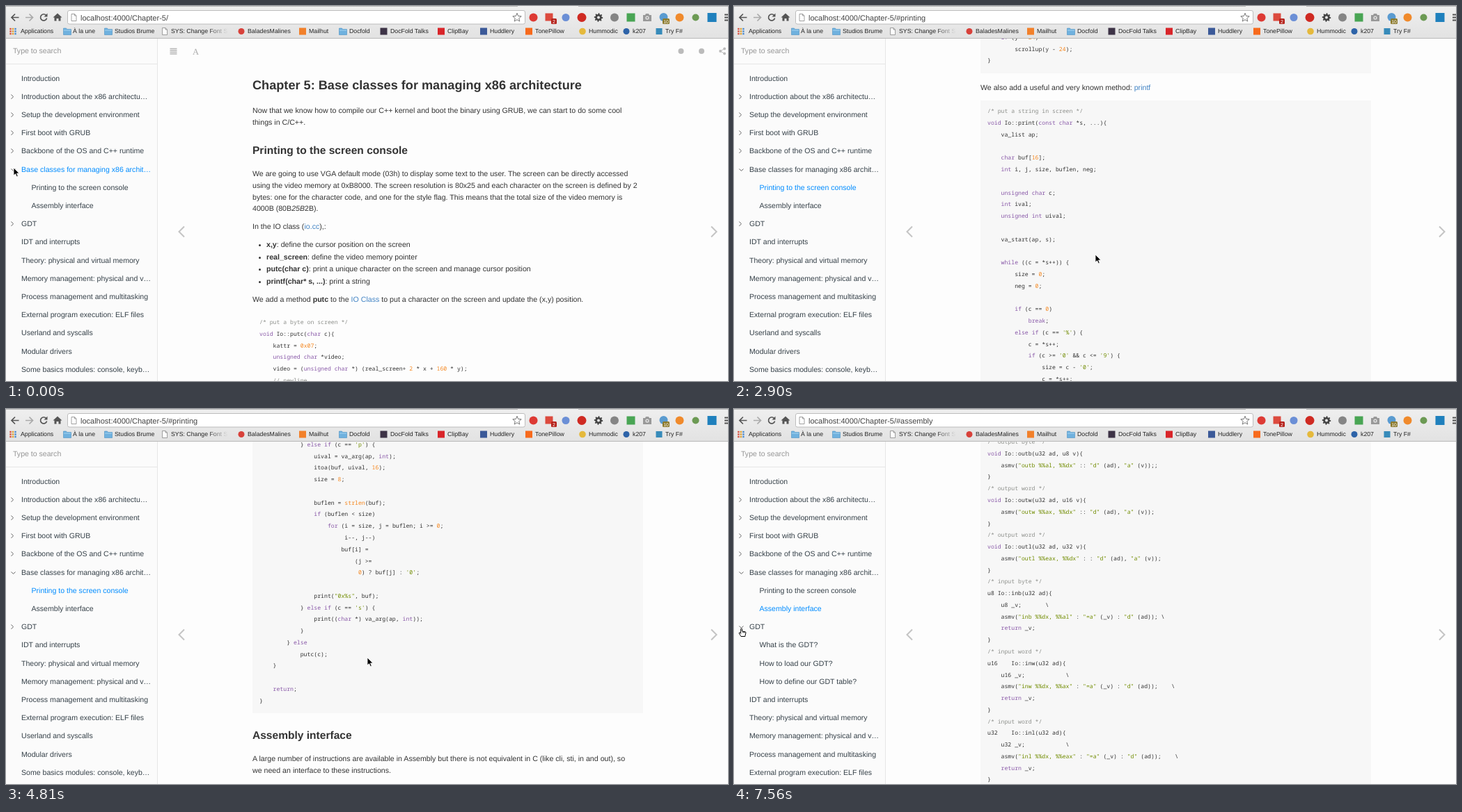
Animation of 1037x540 px, one loop 8000 ms. Source, as an HTML page:

```html
<!DOCTYPE html>
<html lang="en">
<head>
<meta charset="utf-8">
<title>Documentation reader</title>
<style>
  html, body { margin: 0; width: 100%; height: 100%; overflow: hidden; }
  body { background: #fdfdfd; color: #333; font: 10.63px/16.76px "Liberation Sans", Arial, sans-serif; text-rendering: geometricPrecision; }
  #stage { position: relative; width: 1037px; height: 540px; overflow: hidden; }
  #stage svg { position: absolute; left: 0; top: 0; overflow: visible; }
  #page { position: absolute; left: 0; top: 0; width: 1037px; height: 3500px; }
  .line { position: absolute; white-space: pre; height: 20px; line-height: 20px; }
  .line i { font-style: italic; }
  .line u { color: #4183c4; text-decoration: none; }
  .h1 { font-size: 18.15px; font-weight: bold; }
  .h2 { font-size: 15.55px; font-weight: bold; }
  pre { position: absolute; left: 354px; width: 551px; margin: 0; padding: 8.2px 0 9px 10px;
        background: #f7f7f7; font: 8.16px/16.76px "Noto Sans Mono", "DejaVu Sans Mono", monospace; }
  .com { color: #8e908c; }
  .str { color: #718c00; }
  .num { color: #f5871f; }
  .key { color: #8959a8; }
  #side { position: absolute; left: 0; top: 46px; width: 217px; height: 494px; background: #fbfbfb;
          border-right: 1px solid #e6e6e6; overflow: hidden; font-size: 10.57px; }
  #side .search { left: 10px; top: 9px; color: #959595; }
  #side .rule { position: absolute; top: 37px; width: 217px; height: 1px; background: #e6e6e6; }
  .row { color: #364149; left: 0; }
  .row span { position: absolute; left: 22px; }
  .row.sub span { left: 36.5px; }
  .row.on { color: #008cff; }
  .row path { fill: none; stroke: #666; }
</style>
</head>
<body>
<div id="stage">
  <div id="page"></div>
  <div id="side">
    <div class="line search">Type to search</div>
    <div class="rule"></div>
  </div>
  <svg id="chrome" width="1037" height="540" font-family="'Liberation Sans', Arial, sans-serif"></svg>
  <svg id="cursor" width="1" height="1" stroke-linejoin="round">
    <path id="arrow" d="M0 0V11L2.6 8.7 4.4 12.7 6.2 11.9 4.5 8H8Z" fill="#000" stroke="#fff" stroke-width=".8"/>
    <path id="beam" d="M-2.5-6Q0-6 0-4V4Q0 6-2.5 6M2.5-6Q0-6 0-4V4Q0 6 2.5 6M-1.2 2H1.2" fill="none" stroke="#222"/>
    <path id="hand" d="M-1.5 5.5L-3.6 2.2Q-4 .6-2.4 1L-1.3 2.3V-4.4Q-.4-6 .6-4.4V-1L5-.2Q6-.1 6 1.2L5 5.5V6.5H-1Z
      M2-.4V1.4M4-.2V1.5" fill="#fff" stroke="#000"/>
  </svg>
</div>
<script>
const LOOP = 8000;
const $ = id => document.getElementById(id);
const esc = s => s.replace(/&/g, '&amp;').replace(/</g, '&lt;').replace(/>/g, '&gt;');

// ---- article ----
const page = $('page');
const add = html => page.insertAdjacentHTML('beforeend', html);
const line = (y, html, x = 354, cls = '') =>
  add(`<div class="line ${cls}" style="left:${x}px;top:${y - 10}px">${html}</div>`);

const TOKENS = /(\/\*.*?\*\/|\/\/.*)|("[^"]*"|'[^']*')|\b(0x[\da-f]+|\d+|strlen)\b|\b(void|unsigned|char|int|const|if|else|for|while|break|return)\b/g;
const KINDS = ['com', 'str', 'num', 'key'];
const paint = src => esc(src).replace(TOKENS, (all, ...groups) =>
  `<span class="${KINDS[groups.slice(0, 4).findIndex(Boolean)]}">${all}</span>`);
const code = (top, src) => add(`<pre style="top:${top}px">${paint(src)}</pre>`);

const putc = String.raw`/* put a byte on screen */
void Io::putc(char c){
    kattr = 0x07;
    unsigned char *video;
    video = (unsigned char *) (real_screen+ 2 * x + 160 * y);
    // newline
    if (c == '\n') {
        x = 0;
        y++;
    // back space
    } else if (c == '\b') {
        if (x) {
            *(video + 1) = 0x0;
            x--;
        }
    // horizontal tab
    } else if (c == '\t') {
        x = x + 8 - (x % 8);
    // carriage return
    } else if (c == '\r') {
        x = 0;
    } else {
        *video = c;
        *(video + 1) = kattr;

        x++;
        if (x > 79) {
            x = 0;
            y++;
        }
    }
    if (y > 24)
        scrollup(y - 24);
}`;

const pad = `
                buflen = strlen(buf);
                if (buflen < size)
                    for (i = size, j = buflen; i >= 0;
                         i--, j--)
                        buf[i] =
                            (j >=
                             0) ? buf[j] : '0';
`;
const convert = base => `                uival = va_arg(ap, int);
                itoa(buf, uival, ${base});`;
const print = `/* put a string in screen */
void Io::print(const char *s, ...){
    va_list ap;

    char buf[16];
    int i, j, size, buflen, neg;

    unsigned char c;
    int ival;
    unsigned int uival;

    va_start(ap, s);

    while ((c = *s++)) {
        size = 0;
        neg = 0;

        if (c == 0)
            break;
        else if (c == '%') {
            c = *s++;
            if (c >= '0' && c <= '9') {
                size = c - '0';
                c = *s++;
            }

            if (c == 'd') {
                ival = va_arg(ap, int);
                if (ival < 0) {
                    uival = 0 - ival;
                    neg++;
                } else
                    uival = ival;
                itoa(buf, uival, 10);
${pad}
                if (neg)
                    print("-%s", buf);
                else
                    print(buf);
            }
             else if (c == 'u') {
${convert(10)}
${pad}
                print(buf);
            } else if (c == 'x' || c == 'X') {
${convert(16)}
${pad}
                print("0x%s", buf);
            } else if (c == 'p') {
${convert(16)}
                size = 8;
${pad}
                print("0x%s", buf);
            } else if (c == 's') {
                print((char *) va_arg(ap, int));
            }
        } else
            putc(c);
    }

    return;
}`;

const asm = String.raw`/* output byte */
void Io::outb(u32 ad, u8 v){
    asmv("outb %%al, %%dx" :: "d" (ad), "a" (v));;
}
/* output word */
void Io::outw(u32 ad, u16 v){
    asmv("outw %%ax, %%dx" :: "d" (ad), "a" (v));
}
/* output word */
void Io::outl(u32 ad, u32 v){
    asmv("outl %%eax, %%dx" : : "d" (ad), "a" (v));
}
/* input byte */
u8 Io::inb(u32 ad){
    u8 _v;       \
    asmv("inb %%dx, %%al" : "=a" (_v) : "d" (ad)); \
    return _v;
}
/* input word */
u16    Io::inw(u32 ad){
    u16 _v;            \
    asmv("inw %%dx, %%ax" : "=a" (_v) : "d" (ad));    \
    return _v;
}
/* input word */
u32    Io::inl(u32 ad){
    u32 _v;            \
    asmv("inl %%dx, %%eax" : "=a" (_v) : "d" (ad));    \
    return _v;
}`;

const para = (y, ...rows) => rows.forEach((row, i) => line(y + i * 16.76, row));
line(113.5, 'Chapter 5: Base classes for managing x86 architecture', 354, 'h1');
para(151, 'Now that we know how to compile our C++ kernel and boot the binary using GRUB, we can start to do some cool',
  'things in C/C++.');
line(209, 'Printing to the screen console', 354, 'h2');
para(242, 'We are going to use VGA default mode (03h) to display some text to the user. The screen can be directly accessed',
  'using the video memory at 0xB8000. The screen resolution is 80x25 and each character on the screen is defined by 2',
  'bytes: one for the character code, and one for the style flag. This means that the total size of the video memory is',
  '4000B (80B<i>25B</i>2B).');
para(318, 'In the IO class (<u>io.cc</u>),:');
[['x,y', 'define the cursor position on the screen'],
 ['real_screen', 'define the video memory pointer'],
 ['putc(char c)', 'print a unique character on the screen and manage cursor position'],
 ['printf(char* s, ...)', 'print a string']].forEach(([name, text], i) => {
  const y = 344 + i * 17.5;
  line(y, `<b>${name}</b>: ${text}`, 374);
  add(`<div style="position:absolute;left:363px;top:${y - 1}px;width:3.4px;height:3.4px;border-radius:50%;background:#333"></div>`);
});
para(423, 'We add a method <b>putc</b> to the <u>IO Class</u> to put a character on the screen and update the (x,y) position.');
code(440, putc);
para(1048, 'We also add a useful and very known method: <u>printf</u>');
code(1066, print);
line(2742, 'Assembly interface', 354, 'h2');
para(2775, 'A large number of instructions are available in Assembly but there is not equivalent in C (like cli, sti, in and out), so',
  'we need an interface to these instructions.');
para(2818, 'In C, we can include Assembly using the directive "asm()", gcc use gas to compile the assembly.');
para(2844, '<b>Caution:</b> gas uses the AT&amp;T syntax.');
code(2861, asm);
add(`<svg width="1037" height="90" fill="#bbb">
  <path d="M235.5 61.5h10M235.5 64h10M235.5 66.5h10M235.5 69h10" stroke="#b5b5b5" stroke-width="1.3"/>
  <text x="268" y="69.5" font-size="12.5" font-family="'Liberation Serif', serif" fill="#aaa">A</text>
  <circle cx="969.5" cy="65" r="4"/><circle cx="999" cy="65" r="4"/>
  <path d="M1032 61.5L1026 65l6 3.5" fill="none" stroke="#bbb"/>
  <circle cx="1032" cy="61.5" r="1.9"/><circle cx="1026" cy="65" r="1.9"/><circle cx="1032" cy="68.5" r="1.9"/></svg>`);

// ---- sidebar: '+' can open, '-' is a section ----
const rows = `Introduction
+Introduction about the x86 architectu…
+Setup the development environment
+First boot with GRUB
+Backbone of the OS and C++ runtime
+Base classes for managing x86 archit…
-Printing to the screen console
-Assembly interface
+GDT
-What is the GDT?
-How to load our GDT?
-How to define our GDT table?
IDT and interrupts
Theory: physical and virtual memory
Memory management: physical and v…
Process management and multitasking
External program execution: ELF files
Userland and syscalls
Modular drivers
Some basics modules: console, keyb…`.split('\n').map(text => {
  const el = document.createElement('div');
  const mark = /^[+-]/.test(text) ? text[0] : '';
  el.className = 'line row' + (mark === '-' ? ' sub' : '');
  el.innerHTML = `<span>${text.slice(mark.length)}</span>` +
    (mark === '+' ? '<svg width="20" height="20"><path/></svg>' : '');
  $('side').append(el);
  return el;
});
const CHAPTER = 5, PRINTING = 6, ASSEMBLY = 7, GDT = 8;

function drawSide(active, open) {
  let n = 0;
  rows.forEach((el, i) => {
    const hidden = i > GDT && i <= GDT + 3 && !open;
    el.style.display = hidden ? 'none' : '';
    if (hidden) return;
    el.style.top = 48.5 + 26.2 * n++ + 'px';
    el.classList.toggle('on', i === active);
    const down = i === CHAPTER || (i === GDT && open);
    el.querySelector('path')?.setAttribute('d', down ? 'M7.5 8.5l3 3 3-3' : 'M7.5 6.5l3 3.2-3 3.2');
  });
}

// ---- browser bars ----
const dot = (x, y, c, r = 5.5) => `<circle cx="${x}" cy="${y}" r="${r}" fill="${c}"/>`;
const box = (x, y, c, r = 5) => `<rect x="${x - r}" y="${y - r}" width="${2 * r}" height="${2 * r}" fill="${c}"/>`;
const folder = x => `<path d="M${x - 5.5} 32h4l1 1.5h6v8h-11z" fill="#6fb1de" stroke="#4b90c3" stroke-width=".6"/>
  <path d="M${x - 5} 35h10" stroke="#a7d4f0"/>`;
const sheet = (x, y) => `<path d="M${x - 3.5} ${y - 5}h4.5l2.5 2.5v7.5h-7zM${x + 1} ${y - 5}v2.5h2.5" fill="#fff" stroke="#888" stroke-width=".8"/>`;
const grid = (x, y) => Array.from({ length: 9 }, (_, i) =>
  box(x + (i % 3 - 1) * 3.5, y + (Math.floor(i / 3) - 1) * 3.5, ['#d85040', '#e0a030', '#4a8ad0'][i % 3], 1.2)).join('');
const polar = (n, fn) => Array.from({ length: n }, (_, i) => {
  const a = i * 2 * Math.PI / n - Math.PI / 2, r = fn(i);
  return [r * Math.cos(a), r * Math.sin(a)].map(v => v.toFixed(2));
}).join(' ');

const marks = [
  [21, 'Applications', grid(10, 36.5)],
  [96, 'À la une', folder(88)],
  [156, 'Studios Brume', folder(147)],
  [237, 'SYS: Change Font S', sheet(228, 36.5)],
  [347, 'BaladesMalines', dot(338, 36.5, '#d8413a', 4.5)],
  [435, 'Mailhut', box(426, 36.5, '#f2802a')],
  [493, 'Docfold', folder(484)],
  [552, 'DocFold Talks', box(542.5, 36.5, '#3d3346')],
  [634, 'ClipBay', box(625, 36.5, '#d9252a')],
  [695, 'Huddlery', box(686, 36.5, '#3b5998')],
  [760, 'TonePillow', box(751, 36.5, '#f76a1c')],
  [837, 'Hummodic', dot(828, 36.5, '#e5b93c', 4.8)],
  [900, 'k207', dot(891, 36.5, '#2d63a8', 4.5)],
  [947, 'Try F#', box(938, 36.5, '#378bba', 4.5)]
].map(([x, text, icon]) => icon +
  `<text x="${x}" y="39.3" font-size="8.75" fill="${text.startsWith('SYS') ? 'url(#fade)' : '#222'}">${text}</text>`).join('');

$('chrome').innerHTML = `
  <defs>
    <linearGradient id="bar" x2="0" y2="1"><stop stop-color="#efefef"/><stop offset="1" stop-color="#e2e2e2"/></linearGradient>
    <linearGradient id="fade" gradientUnits="userSpaceOnUse" x1="290" x2="319"><stop stop-color="#222"/><stop offset="1" stop-color="#222" stop-opacity="0"/></linearGradient>
  </defs>
  <rect width="1037" height="46.5" fill="url(#bar)"/>
  <path d="M0 .5H735M822 .5H1037" stroke="#b8b8b8"/><path d="M0 46.5H1037" stroke="#b9b9b9"/>
  <g fill="none" stroke="#555" stroke-width="1.7">
    <path d="M18.5 16.5H8.5M13 11.5l-5 5 5 5"/>
    <path d="M28 16.5h10M33.5 11.5l5 5-5 5" stroke="#aaa"/>
    <path d="M57.5 13.2A4.6 4.6 0 1 0 58.6 17.5"/>
  </g>
  <path d="M59.5 10.5v5h-5zM74 10.5l6.5 6h-2v5h-3v-3.5h-3v3.5h-3v-5h-2z" fill="#555"/>
  <rect x="88.5" y="6.5" width="657" height="19.5" rx="2.5" fill="#fff" stroke="#bdbdbd"/>
  ${sheet(97.5, 16.5)}
  <text id="url" x="107" y="20.5" font-size="11" fill="#444"></text>
  <polygon transform="translate(734 16.8)" points="${polar(10, i => i % 2 ? 2.9 : 6.5)}" fill="#fff" stroke="#777"/>
  ${dot(757.5, 16.5, '#dd3a34', 6)}${box(780, 16, '#dc4a3e', 5.5)}
  <rect x="783" y="18" width="8" height="8" rx="1.5" fill="#b5221b"/><text x="785" y="24.8" font-size="7" fill="#fff">2</text>
  ${dot(804, 16.5, '#6b8fd6')}${dot(827, 16.5, '#cf2a22', 6.5)}
  <polygon transform="translate(851 16.5)" points="${polar(32, i => i % 4 < 2 ? 6.3 : 4.6)}" fill="#444"/>${dot(851, 16.5, '#e9e9e9', 2)}
  ${dot(874, 16.5, '#858585', 6)}${box(897.5, 16.5, '#49a554', 6)}
  <path d="M915 13h3l1-2h4l1 2h3v9h-12z" fill="#999"/>${dot(921, 17, '#e6e6e6', 2.6)}${dot(921, 17, '#999', 1.3)}
  ${dot(944.5, 16, '#5a9bd0', 6)}
  <rect x="943" y="18" width="10" height="8" rx="1.5" fill="#8c7a2d"/><text x="944.2" y="24.6" font-size="6.8" fill="#fff">10</text>
  ${dot(967.5, 16.5, '#f08a2c', 6)}${dot(990.5, 16.5, '#6c9a54', 5)}${box(1014, 16.5, '#1f80bd', 6.5)}
  <path d="M1032 12.5h6M1032 16.5h6M1032 20.5h6" stroke="#555" stroke-width="1.8"/>
  ${marks}
  <path d="M256 317.5l-7.5 7.5 7.5 7.5M1013 317.5l7.5 7.5-7.5 7.5" fill="none" stroke="#c4c4c4" stroke-width="2"/>`;

// ---- motion ----
const span = (from, to, n) => Array.from({ length: n }, (_, i) => from + (to - from) * i / (n - 1));
const ticks = [0, 1220, 1370, 1580, 1770, 1960, 2150, ...span(2300, 3200, 7),
  3350, 3500, 3640, 3790, 3930, 4080, 4230, 4370, ...span(4520, 5490, 7), 5640, 5780];
const scrollPath = [[0, 0], [1070, 0], [1220, 10], [1370, 47], [1580, 130], [2150, 454], [2900, 930],
  [4080, 1856], [5000, 2490], [5490, 2757], [5640, 2805], [5780, 2829]];
const pointer = [
  [0, 11, 233, 'arrow'], [480, 22, 224, 'arrow'], [630, 160, 248, 'arrow'], [770, 400, 326, 'arrow'],
  [920, 519.5, 361, 'beam'], [1370, 519.5, 362, 'beam'], [1580, 519, 358, 'arrow'],
  [6070, 513, 366, 'arrow'], [6220, 470, 377, 'arrow'], [6370, 372, 376, 'arrow'], [6520, 250, 362, 'arrow'],
  [6670, 130, 342, 'arrow'], [6820, 48, 325, 'arrow'], [6970, 11, 317, 'arrow'], [7120, 11, 321, 'hand']
];

const last = (list, test) => list.filter(test).pop();

function scrollAt(t) {
  const tick = last(ticks, v => v <= t);
  const i = scrollPath.findIndex(p => p[0] >= tick);
  if (i < 1) return 0;
  const [t0, y0] = scrollPath[i - 1], [t1, y1] = scrollPath[i];
  return Math.round(y0 + (y1 - y0) * (tick - t0) / (t1 - t0));
}

function draw(now) {
  const t = now % LOOP, y = scrollAt(t);
  page.style.transform = `translateY(${-y}px)`;
  page.querySelector('pre').style.background = t < 1220 ? 'none' : '';
  const active = y > 2640 ? ASSEMBLY : y > 110 ? PRINTING : CHAPTER;
  $('url').textContent = 'localhost:4000/Chapter-5/' + ({ [PRINTING]: '#printing', [ASSEMBLY]: '#assembly' }[active] || '');
  drawSide(active, t >= 7560);
  const [, px, py, shape] = last(pointer, p => p[0] <= t);
  $('cursor').style.transform = `translate(${px}px, ${py}px)`;
  for (const id of ['arrow', 'beam', 'hand']) $(id).style.display = id === shape ? '' : 'none';
}

function frame() {
  draw(performance.now());
  requestAnimationFrame(frame);
}
frame();
</script>
</body>
</html>
```
